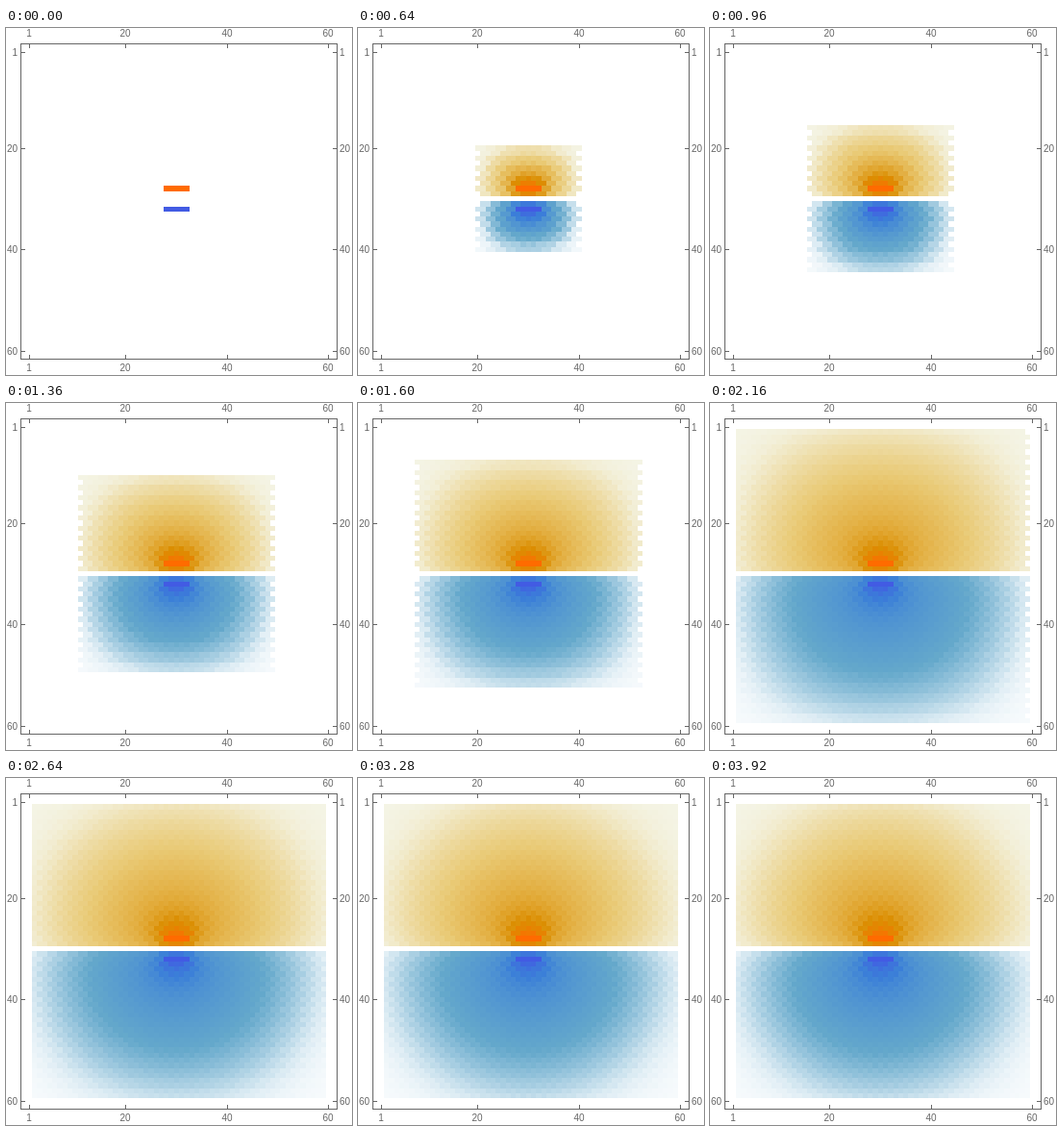
Animation, 360 px wide and 361 px high, one loop 4000 ms. Source, as an HTML page with a canvas:

```html
<!DOCTYPE html>
<html lang="en">
<head>
<meta charset="utf-8">
<title>Potential of two plates</title>
<style>
  html, body { margin: 0; width: 100%; height: 100%; overflow: hidden; background: #fff; }
  canvas { display: block; }
</style>
</head>
<body>
<canvas id="plot" width="360" height="361"></canvas>
<script>
const ctx = document.getElementById('plot').getContext('2d');
const SIZE = 60, STEPS = 50, STEP_MS = 80;
const CELL = 5.272, LEFT = 21.8, TOP = 22.1;
const FRAME = { left: 15, top: 16, right: 344, bottom: 344 };

// Colour stops from zero to the largest magnitude
const POSITIVE = [[244, 244, 229], [233, 202, 118], [219, 142, 2], [255, 107, 0]];
const NEGATIVE = [[246, 250, 252], [100, 168, 203], [59, 127, 216], [66, 91, 227]];

const edgeX = col => Math.round(LEFT + col * CELL);
const edgeY = row => Math.round(TOP + row * CELL);

function holdPlates(grid) {
  for (let col = 27; col <= 31; col++) {
    grid[27 * SIZE + col] = 1;
    grid[31 * SIZE + col] = -1;
  }
  return grid;
}

// Each inner cell becomes the mean of its diagonal neighbours
function relax(grid) {
  const next = new Float64Array(SIZE * SIZE);
  for (let row = 1; row < SIZE - 1; row++) {
    for (let col = 1; col < SIZE - 1; col++) {
      const i = row * SIZE + col, up = i - SIZE, down = i + SIZE;
      next[i] = ((grid[up - 1] + grid[down - 1]) + (grid[up + 1] + grid[down + 1])) / 4;
    }
  }
  return holdPlates(next);
}

function blend(stops, t) {
  const k = Math.min(Math.floor(t * 3), 2), f = t * 3 - k;
  return `rgb(${stops[k].map((c, j) => Math.round(c + (stops[k + 1][j] - c) * f))})`;
}

// The scale is half linear and half by rank among the non-zero cells
function colorize(grid) {
  const sorted = grid.filter(v => v !== 0).map(Math.abs).sort();
  const rank = new Map();
  sorted.forEach((v, i) => rank.set(v, (i + 1) / sorted.length));
  return Array.from(grid, v => {
    const size = Math.abs(v);
    return v && blend(v > 0 ? POSITIVE : NEGATIVE, (size + rank.get(size)) / 2);
  });
}

const pictures = [];
let field = holdPlates(new Float64Array(SIZE * SIZE));
for (let n = 0; n < STEPS; n++) {
  pictures.push(colorize(field));
  field = relax(field);
}

function drawAxes() {
  const { left, top, right, bottom } = FRAME;
  ctx.strokeStyle = ctx.fillStyle = '#666';
  ctx.lineWidth = 1;
  ctx.strokeRect(left + 0.5, top + 0.5, right - left, bottom - top);
  ctx.font = '10px "Liberation Sans", Arial, sans-serif';
  const label = (text, x, y, align) => {
    ctx.textAlign = align;
    ctx.fillText(text, x, y);
  };
  for (const n of [1, 20, 40, 60]) {
    const x = Math.floor(LEFT + (n - 0.5) * CELL);
    const y = Math.round(TOP + (n - 0.5) * CELL);
    ctx.fillRect(x, top, 1, 5);
    ctx.fillRect(x, bottom - 4, 1, 5);
    ctx.fillRect(left, y, 5, 1);
    ctx.fillRect(right - 4, y, 5, 1);
    label(n, x, 9, 'center');
    label(n, x, 357, 'center');
    label(n, 12, y + 4, 'right');
    label(n, 347, y + 4, 'left');
  }
}

function draw(time) {
  ctx.fillStyle = '#fff';
  ctx.fillRect(0, 0, 360, 361);
  pictures[Math.floor(time / STEP_MS) % STEPS].forEach((color, i) => {
    if (!color) return;
    const col = i % SIZE, row = Math.floor(i / SIZE);
    const x = edgeX(col), y = edgeY(row);
    ctx.fillStyle = color;
    ctx.fillRect(x, y, edgeX(col + 1) - x, edgeY(row + 1) - y);
  });
  drawAxes();
}

function loop() {
  draw(performance.now());
  requestAnimationFrame(loop);
}
loop();
</script>
</body>
</html>
```
